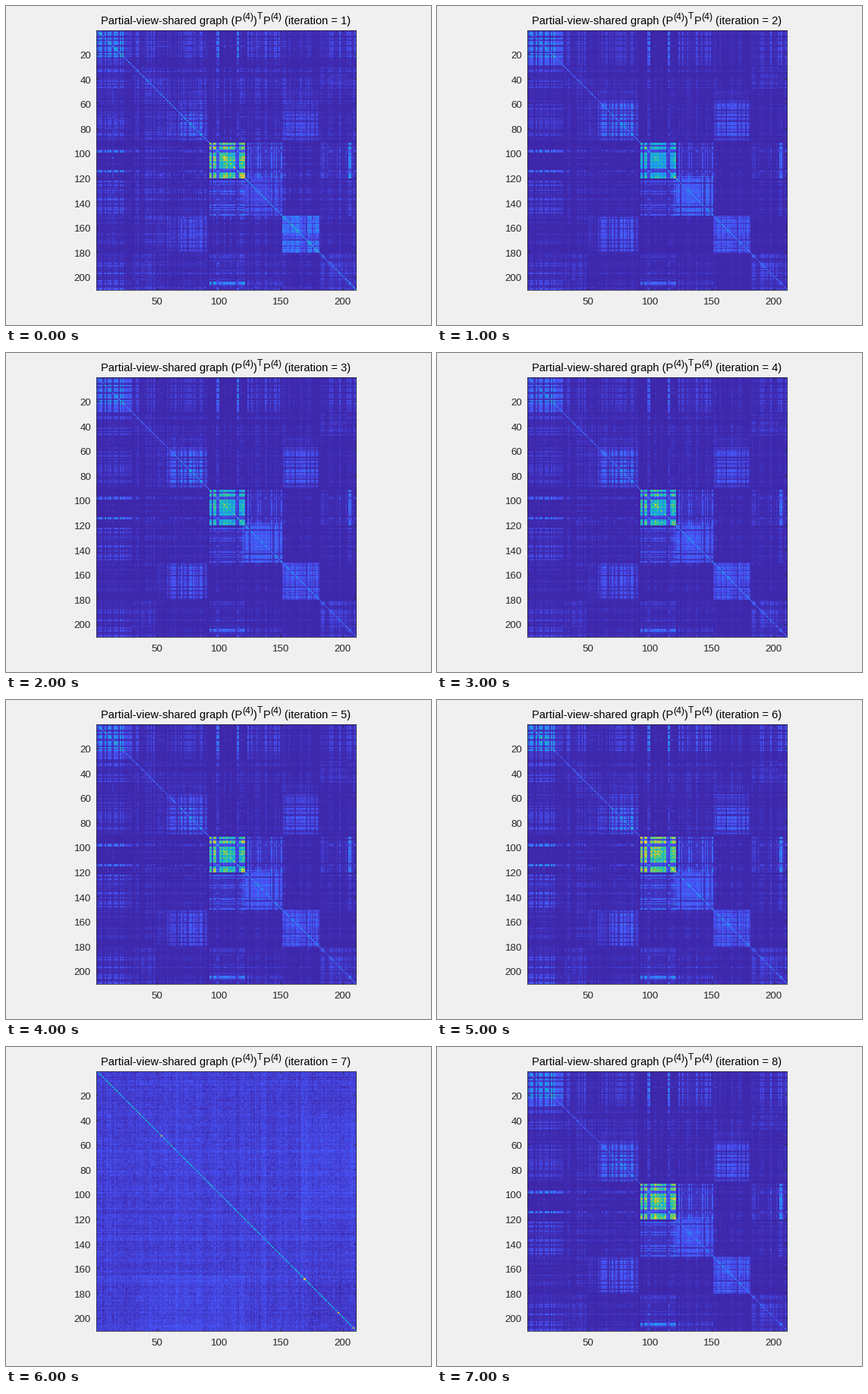
Animation, 560 px wide and 420 px high, one loop 8000 ms. Source, as a matplotlib script:

```python
import numpy as np
import matplotlib.pyplot as plt
from matplotlib.animation import FuncAnimation
from matplotlib.colors import LinearSegmentedColormap

W, H, DPI = 560, 420, 100
N = 210
LEFT, TOP, SIDE = 118.65, 31.5, 342.3
INK = "#262626"

plt.rcParams["font.family"] = "Liberation Sans"

PARULA = LinearSegmentedColormap.from_list("parula", [
    (0.2422, 0.1504, 0.6603), (0.2810, 0.3228, 0.9579),
    (0.1786, 0.5289, 0.9682), (0.0689, 0.6948, 0.8394),
    (0.2161, 0.7843, 0.5923), (0.6720, 0.7793, 0.2227),
    (0.9970, 0.7659, 0.2199), (0.9769, 0.9839, 0.0805)], N=256)

rng = np.random.RandomState(12)


def profile(*parts):
    """Membership of the samples: (start, stop, level, density) per part."""
    v = np.zeros(N)
    for start, stop, level, density in parts:
        n = stop - start
        on = rng.rand(n) < density
        v[start:stop] = level * np.where(on, 0.8 + 0.4 * rng.rand(n), 0.2)
    return v


# Groups of samples that resemble one another
first = profile((0, 22, 1, .72), (22, 30, .7, .5), (30, 48, .35, .45),
                (48, 60, .12, .3), (60, 90, .26, .4), (97, 99, .8, 1),
                (113, 115, .8, 1), (122, 150, .45, .5),
                (150, 180, .12, .2), (180, 210, .42, .35))
third = profile((48, 60, .4, .4), (60, 90, 1, .8), (150, 180, .75, .75))
fourth = profile((91, 97, 1, .9), (97, 99, .2, 1), (99, 112, 1, .93),
                 (112, 115, .2, 1), (115, 120, .95, .8), (122, 150, .32, .35),
                 (180, 203, .1, .3), (203, 206, .45, 1), (206, 210, .1, .3))
fourth[[95, 105, 118]] = 1.22
fifth = profile((118, 150, 1, .75))
sixth = profile((150, 164, 1, .85), (164, 170, .4, .5), (170, 180, 1, .8))
last = profile((30, 48, .6, .5), (180, 210, 1, .6))
diffuse = profile((0, 210, 1, .3))
GROUPS = [first, third, fourth, fifth, sixth, last, diffuse]

# Group gains, diagonal, grain, and how far the loose edge samples belong
STEPS = {
    1: ([.25, .13, .48, .07, .16, .06, .065], .18, .022, .35),
    2: ([.23, .18, .34, .14, .07, .09, .030], .12, .013, 1),
    3: ([.22, .17, .36, .13, .07, .08, .032], .12, .013, 1),
    4: ([.21, .16, .39, .12, .07, .08, .035], .12, .014, 1),
    5: ([.24, .16, .44, .12, .07, .07, .035], .12, .015, .7),
    6: ([.28, .17, .49, .12, .07, .07, .042], .12, .016, .35),
    8: ([.26, .17, .49, .12, .07, .07, .036], .10, .015, 1),
}


def grain(r, amount):
    g = r.normal(0, amount, (N, N))
    return (g + g.T) / np.sqrt(2)


def grouped(step):
    gains, diag, amount, edge = STEPS[step]
    r = np.random.RandomState(50 + step)
    loose = np.ones(N)
    loose[22:30] = loose[60:66] = edge
    m = np.zeros((N, N))
    for gain, group in zip(gains, GROUPS):
        v = group * loose * r.normal(1, 0.06, N)
        m += gain * np.outer(v, v)
    m *= 1 + grain(r, 0.1)
    m += np.abs(grain(r, amount)) * (0.3 + m / (m + 0.04))
    d = np.arange(N)
    m[d, d] += diag * (0.6 + 0.7 * r.rand(N))
    return m


def scattered():
    r = np.random.RandomState(77)
    a = r.normal(0, 0.014, N)
    m = 0.088 + a[:, None] + a[None, :] + grain(r, 0.02)
    m[37:120, 165:] += 0.018
    m[165:, 37:120] += 0.018
    m[150:165, :] -= 0.013
    m[:, 150:165] -= 0.013
    m[165:, 165:] -= 0.015
    d = np.arange(N)
    m[d, d] = 0.38 + 0.06 * r.normal(size=N)
    m[[34, 52, 167, 168, 195, 207], [34, 52, 167, 168, 195, 207]] = 0.85
    m[167, 168] = m[168, 167] = 0.8
    return m


graphs = [scattered() if s == 7 else grouped(s) for s in range(1, 9)]

fig = plt.figure(figsize=(W / DPI, H / DPI), dpi=DPI, facecolor="#f0f0f0")
ax = fig.add_axes([LEFT / W, 1 - (TOP + SIDE) / H, SIDE / W, SIDE / H])
image = ax.imshow(graphs[0], cmap=PARULA, vmin=0, vmax=1, aspect="auto",
                  interpolation="nearest", extent=(.5, N + .5, N + .5, .5))
xticks, yticks = range(50, 201, 50), range(20, 201, 20)
ax.set_xticks(xticks)
ax.set_yticks(yticks)
ax.tick_params(direction="in", length=2.5, width=0.5, color=INK, top=True,
               right=True, labelbottom=False, labelleft=False)
for spine in ax.spines.values():
    spine.set(linewidth=0.5, color=INK)


def label(x, y, s, px, color=INK, ha="left"):
    """Text with its baseline at y pixels from the top."""
    return fig.text(x / W, 1 - y / H, s, size=px * 72 / DPI, color=color,
                    ha=ha, va="baseline")


def along(value):
    return (value - 0.5) * SIDE / N


for t in xticks:
    label(LEFT + along(t), 393, str(t), 13.33, ha="center")
for t in yticks:
    label(112, TOP + along(t) + 5.7, str(t), 13.33, ha="right")

BIG, SMALL = 14.67, 12.2
label(125, 24, "Partial-view-shared graph (P", BIG, "black")
label(310.8, 18, "(4)", SMALL, "black")
label(325.7, 24, ")", BIG, "black")
label(330.8, 17, "T", SMALL, "black")
label(338.4, 24, "P", BIG, "black")
label(348.2, 18, "(4)", SMALL, "black")
caption = label(367.2, 24, "(iteration = 1)", BIG, "black")


def update(i):
    image.set_data(graphs[i])
    caption.set_text(f"(iteration = {i + 1})")
    return image, caption


anim = FuncAnimation(fig, update, frames=8, interval=1000, repeat=True,
                     repeat_delay=0, blit=False)
plt.show()
```
